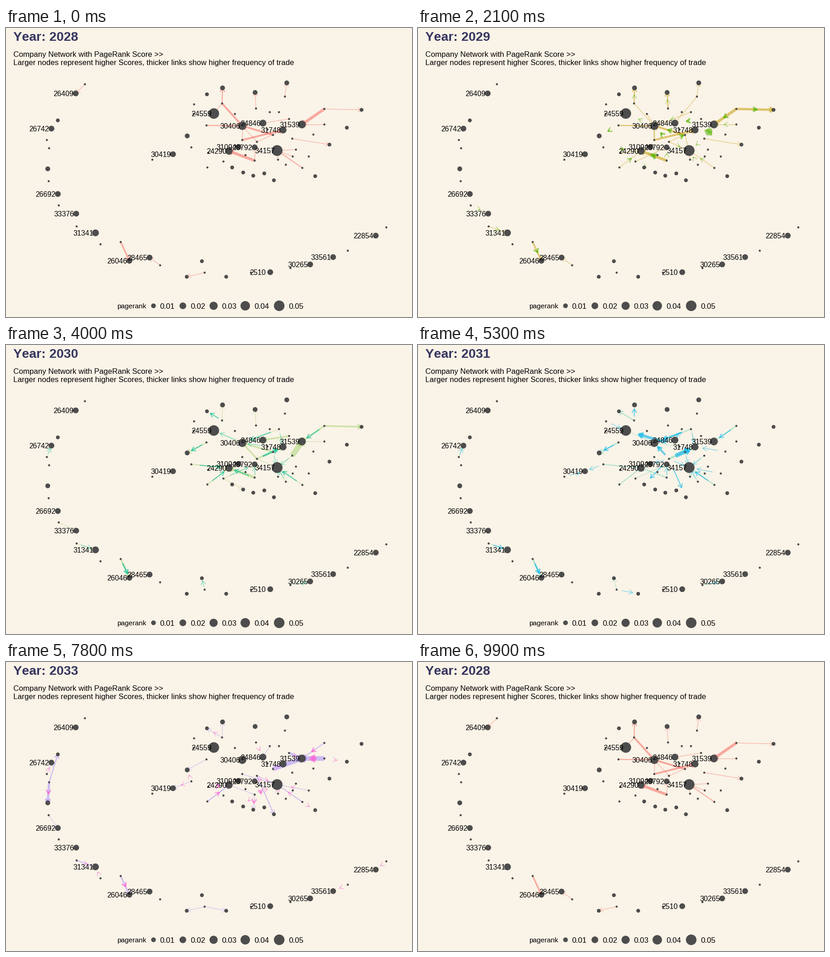
Recreate the animation shown at these times as a matplotlib script. Size 885 by 632 pixels, loop 10000 ms.

```python
import matplotlib.pyplot as plt
import numpy as np
from matplotlib.animation import FuncAnimation
from matplotlib.collections import LineCollection

W, H, DPI = 885, 632, 100
PT = 72 / DPI
BG, INK, NAVY = "#FAF3E7", "#4D4D4D", "#36365F"
ALPHA, THIN = 0.6, 1.1
FRAMES, STEP_MS = 100, 100
YEARS = range(2028, 2035)
COLORS = ["#F8766D", "#C49A00", "#53B400", "#00C094", "#00B6EB", "#A58AFF", "#FB61D7"]

# Key points of the network layout
COMPANIES = {
    26409: (152, 143), 24559: (453, 187), 30406: (515, 214), 24846: (560, 208),
    31539: (645, 211), 31748: (604, 223), 26742: (99, 220), 30419: (364, 276),
    31094: (507, 260), 28792: (542, 261), 24290: (486, 269), 34157: (591, 268),
    26692: (113, 363), 33376: (153, 406), 31341: (195, 448), 26046: (269, 509),
    28465: (313, 502), 2510: (576, 534), 30265: (663, 517), 33561: (713, 501),
    22854: (806, 454),
}
RECEIVERS = [  # ids from 1
    (438, 145), (472, 131), (543, 141), (612, 120), (775, 179), (743, 218),
    (705, 255), (395, 236), (113, 202), (91, 308), (517, 316), (539, 323),
    (563, 318), (584, 333), (674, 324), (493, 305), (427, 510), (394, 544),
    (480, 544),
]
SENDERS = [  # ids from 20
    (172, 123), (410, 167), (409, 188), (471, 165), (499, 188), (545, 176),
    (575, 184), (595, 184), (608, 150), (617, 199), (694, 177), (694, 211),
    (437, 213), (570, 222), (582, 234), (515, 245), (547, 249), (624, 242),
    (670, 233), (632, 266), (625, 281), (660, 281), (593, 288), (610, 299),
    (646, 306), (474, 292), (542, 290), (522, 278), (439, 305), (441, 273),
    (404, 261), (319, 288), (89, 245), (94, 263), (93, 335), (115, 388),
    (154, 434), (206, 473), (250, 468), (336, 519), (433, 535), (534, 535),
    (620, 525), (745, 487), (829, 436),
]
nodes = {**COMPANIES, **dict(enumerate(RECEIVERS, 1)), **dict(enumerate(SENDERS, 20))}

# PageRank by kind of node, with the few that stand out
score = {n: 0.015 if n in COMPANIES else 0.0065 if n < 20 else 0.002 for n in nodes}
score.update(dict.fromkeys([2, 3, 4, 8, 10], 0.0105))
score.update(dict.fromkeys([24846, 31748, 31341], 0.021))
score.update({24559: 0.05, 34157: 0.0525, 30406: 0.03, 31539: 0.027, 24290: 0.024})

trades = {year: [] for year in YEARS}


def trade(first, last, width, links):
    """Add links, given as receiver: senders, to each year from first to last."""
    for year in range(2000 + first, 2001 + last):
        trades[year] += [(a, b, width) for b, senders in links.items() for a in senders]


# Lasting trade
trade(28, 34, 3.2, {26046: [58]})
trade(28, 30, 6, {24290: [46]})
trade(28, 29, 6, {31539: [30]})
trade(28, 29, 4, {30406: [34], 31748: [35]})
trade(28, 29, 2.2, {2: [23], 30406: [32]})
trade(30, 32, 2.4, {8: [32]})
trade(30, 31, 2, {24290: [48, 50]})
trade(32, 33, 2, {31539: [30], 31341: [56], 14: [36], 34157: [44]})
trade(33, 34, 10, {31539: [31]})
trade(33, 34, 2.2, {24290: [48]})

# Single strong years
trade(28, 28, 4, {30406: [23]})
trade(28, 28, 2, {34157: [44]})
trade(29, 29, 5, {5: [30]})
trade(29, 29, 2.4, {30406: [35], 3: [25]})
trade(30, 30, 12, {31539: [37]})
trade(30, 30, 3.5, {30406: [34, 36], 31539: [30], 31748: [36], 24846: [29], 5: [30]})
trade(31, 31, 4, {31748: [36]})
trade(31, 31, 2.2, {24290: [46], 31539: [30], 30406: [27], 34157: [44], 1: [23]})
trade(32, 32, 9, {31748: [36]})
trade(32, 32, 6, {24559: [33]})
trade(32, 32, 4, {30406: [27, 36]})
trade(32, 32, 2, {2: [23], 16: [36]})
trade(33, 33, 10, {31539: [34]})
trade(33, 33, 5, {31539: [29], 10: [53]})
trade(33, 33, 2.4, {9: [53]})
trade(34, 34, 3, {10: [53], 13: [36], 12: [46], 31539: [30], 24290: [49]})

# Occasional trade
trade(28, 30, THIN, {31539: [31]})
trade(28, 29, THIN, {4: [28], 7: [37], 28465: [59], 34157: [42]})
trade(28, 28, THIN, {26409: [20], 24559: [23], 30406: [35, 36], 31748: [36],
                     24846: [29], 34157: [39, 40], 28792: [46], 3: [25],
                     5: [30], 18: [60]})
trade(29, 31, THIN, {31341: [56], 28792: [45]})
trade(29, 30, THIN, {34157: [36, 44]})
trade(29, 29, THIN, {24846: [28], 30406: [23, 24, 27], 31748: [36],
                     34157: [34], 24290: [48, 49]})
trade(30, 32, THIN, {28792: [46], 34157: [37, 43]})
trade(30, 31, THIN, {24559: [30406]})
trade(30, 30, THIN, {2: [23], 3: [25], 30406: [27], 11: [45], 33376: [55]})
trade(31, 34, THIN, {26742: [52]})
trade(31, 32, THIN, {31748: [27], 34157: [34], 30265: [62]})
trade(31, 31, THIN, {34157: [42], 30406: [33], 17: [60]})
trade(32, 34, THIN, {30419: [50], 34157: [36, 41]})
trade(32, 33, THIN, {24846: [26], 19: [60]})
trade(32, 32, THIN, {24559: [21], 31748: [38], 31094: [36], 30419: [51]})
trade(33, 34, THIN, {1: [23], 34157: [35, 42]})
trade(33, 33, THIN, {2: [23], 18: [60], 12: [46], 26692: [54], 24290: [46], 8: [32]})
trade(34, 34, THIN, {24846: [25], 31539: [29], 31748: [34], 31341: [56, 57],
                     34157: [44, 46], 22854: [64], 33561: [63],
                     6: [31], 8: [50], 11: [46], 15: [44]})

# First frame and number of steps of the change that follows each year
CHANGES = [(6, 9), (21, 9), (36, 9)] + [(50 + 14 * i, 8) for i in range(4)]


def arrow(a, b, grow, length=10, angle=np.pi / 6):
    """Shaft and open head of a link grown to a share of its length from its middle."""
    a, b = np.array(nodes[a], float), np.array(nodes[b], float)
    mid, half = (a + b) / 2, (b - a) / 2 * grow
    tail, tip = mid - half, mid + half
    back = np.arctan2(*(a - b)[::-1])
    barbs = [tip + length * np.array([np.cos(back + s), np.sin(back + s)])
             for s in (angle, -angle)]
    return [np.array([tail, tip]), np.array([barbs[0], tip, barbs[1]])]


def show_links(lines, i, grow, fade):
    links = trades[YEARS[i]]
    lines.set_segments([p for a, b, _ in links for p in arrow(a, b, grow)])
    lines.set_linewidths([w * PT for *_, w in links for _ in range(2)])
    lines.set_color(COLORS[i])
    lines.set_alpha(ALPHA * fade)


def state(frame):
    """Index of the year being left, the step of its change and the step count."""
    for i, (start, steps) in enumerate(CHANGES):
        if frame < start + steps - 1:
            return i, max(0, frame - start + 1), steps
    return 0, 0, 1


plt.rcParams["font.family"] = "Liberation Sans"
plt.rcParams["text.kerning_factor"] = 6

fig = plt.figure(figsize=(W / DPI, H / DPI), dpi=DPI, facecolor=BG)
ax = fig.add_axes([0, 0, 1, 1])
ax.set_xlim(0, W)
ax.set_ylim(H, 0)
ax.axis("off")


def label(x, y, s, px, **kw):
    return ax.text(x, y, s, fontsize=px * PT, va="baseline", **kw)


def dots(points, scores):
    x, y = np.transpose(points)
    r = 51.5 * np.sqrt(scores)
    ax.scatter(x, y, s=(2 * r * PT) ** 2, c=INK, linewidths=0, zorder=3)


leaving, entering = (
    ax.add_collection(LineCollection([], capstyle="butt", joinstyle="round", zorder=z),
                      autolim=False)
    for z in (1, 2))

dots(list(nodes.values()), [score[n] for n in nodes])
for name, (x, y) in COMPANIES.items():
    label(x - 27, y + 6, str(name), 15.8, ha="center", zorder=4)

title = label(16.2, 28, "", 28.3, weight="bold", color=NAVY)
label(16, 63, "Company Network with PageRank Score >>", 16.6)
label(16, 81.5, "Larger nodes represent higher Scores, "
      "thicker links show higher frequency of trade", 16.6)

label(242, 613, "pagerank", 15.2)
for i, x in enumerate([320.5, 385, 451.5, 521, 595], 1):
    dots([(x, 607)], [i / 100])
    label(x + 13.7 + 1.6 * i, 613.5, f"0.0{i}", 16.6)


def update(frame):
    i, step, steps = state(frame)
    j = (i + 1) % len(YEARS)
    t = step / steps
    show_links(leaving, i, 1, 1 - t)
    show_links(entering, j, t, 1)
    entering.set_visible(t > 0)
    title.set_text(f"Year: {YEARS[i if step <= (steps + 1) // 2 else j]}")
    return leaving, entering, title


anim = FuncAnimation(fig, update, frames=FRAMES, interval=STEP_MS,
                     repeat=True, repeat_delay=0, blit=False)
plt.show()
```
